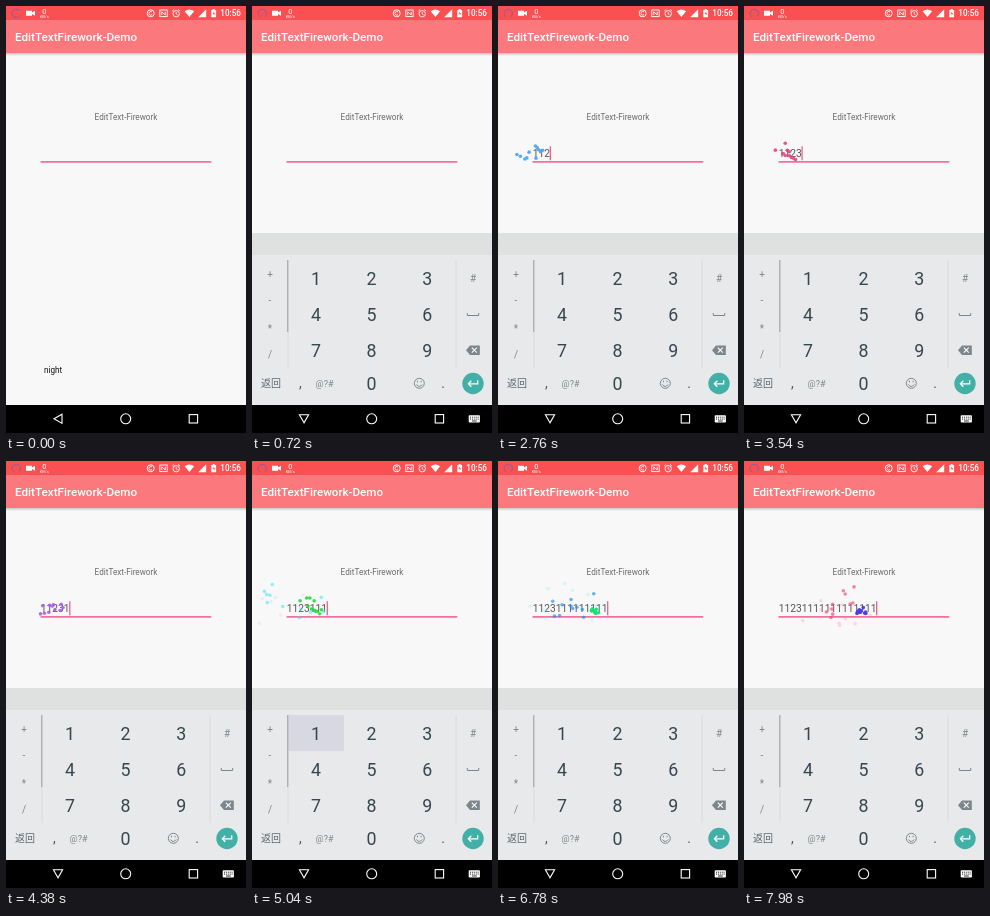
These frames come from a looping animation (240 by 427 pixels, 8000 ms). An HTML page:

```html
<!DOCTYPE html>
<html lang="en">
<head>
<meta charset="utf-8">
<title>EditTextFirework-Demo</title>
<style>
  html, body { margin: 0; width: 100%; height: 100%; overflow: hidden; background: #f8f8f8; }
  svg { display: block; width: 100vw; height: 100vh; font-family: Roboto, sans-serif; }
  .mid { text-anchor: middle; }
  .line { fill: none; stroke: #fff; }
  .digits { font-size: 17.8px; fill: #37474f; }
  .marks { font-size: 10px; fill: #7d878b; }
  .cjk { font-family: "Noto Sans CJK SC", "Noto Sans CJK", sans-serif; fill: #59666c; }
</style>
</head>
<body>
<svg viewBox="0 0 240 427" preserveAspectRatio="none">
  <defs>
    <clipPath id="screen"><rect width="240" height="399"/></clipPath>
    <linearGradient id="shade" x2="0" y2="1">
      <stop stop-color="#000" stop-opacity=".2"/>
      <stop offset="1" stop-color="#000" stop-opacity="0"/>
    </linearGradient>
  </defs>
  <rect width="240" height="427" fill="#f8f8f8"/>

  <text x="120" y="114" class="mid" font-size="8.17" fill="#6a6a6a">EditText-Firework</text>
  <text x="38" y="367" font-size="8.17" fill="#111">night</text>
  <rect x="34.5" y="155.2" width="170.8" height="1.4" fill="#f2508c"/>
  <text id="entry" x="34.8" y="151.2" font-size="10.22" fill="#555"></text>
  <rect id="cursor" y="140.3" width="1.2" height="14" fill="#f2508c"/>
  <g id="sparks"></g>

  <rect y="47" width="240" height="3" fill="url(#shade)"/>
  <rect y="14" width="240" height="33" fill="#fb797d"/>
  <rect width="240" height="14" fill="#fa5052"/>
  <text x="9" y="35" font-size="11.67" font-weight="500" fill="#fff">EditTextFirework-Demo</text>

  <g id="status" fill="#fff">
    <path id="ring" d="M8 11A4.2 4.2 0 1 1 12.5 11" class="line" style="stroke:#8061a8"/>
    <path d="M20 4.8h6v5h-6zM26 6.5l3-1.7v5l-3-1.7z"/>
    <text x="38.3" y="7.6" class="mid" font-size="7.4">0</text>
    <text x="38.3" y="12.2" class="mid" font-size="4.2">KB/s</text>
    <circle cx="144.7" cy="7.3" r="3.5" class="line"/>
    <path d="M146 6a1.8 1.8 0 1 0 0 2.6" class="line" stroke-width=".9"/>
    <rect x="153.8" y="4" width="7.4" height="6.6" class="line" stroke-width=".9"/>
    <path d="M155.8 9V5.8l3.4 3.2V5.8" class="line" stroke-width=".9"/>
    <circle cx="170.2" cy="7.7" r="3.2" class="line" stroke-width=".9"/>
    <path d="M170.2 5.8v2.2l1.4.9M166.3 5l2-1.7M174 5l-2-1.7" class="line" stroke-width=".8"/>
    <path d="M178.7 5.2q4.7-3.4 9.4 0L183.4 11z"/>
    <path d="M200.2 3.2v8h-8z"/>
    <path d="M205.3 4h1.4V3h2v1h1.4v7.3h-4.8z"/>
    <path d="M208.2 5.2l-1.7 2.6h1.2v2l1.5-2.5H208z" fill="#fa5052"/>
    <text x="235" y="10.2" text-anchor="end" font-size="8.17" font-weight="500">10:56</text>
  </g>

  <g clip-path="url(#screen)">
    <g id="keyboard">
      <rect y="227" width="240" height="22" fill="#dfe1e1"/>
      <rect y="249" width="240" height="150" fill="#e8e9ea"/>
      <rect id="pressed" y="254" width="56" height="36" fill="#d7d8e2"/>
      <path d="M36 254v108M204 254v108" stroke="#d4d7d8" stroke-width=".8"/>
      <path d="M35.7 254v72" stroke="#a9afb2" stroke-width="1.3"/>
      <g id="digits" class="mid digits"></g>
      <g class="mid marks">
        <text x="18" y="271.5">+</text><text x="18" y="298">-</text>
        <text x="18" y="326">*</text><text x="18" y="352">/</text>
        <text x="221" y="276">#</text>
        <text x="72.5" y="380.5" font-size="9">@?#</text>
      </g>
      <text x="19" y="381" class="mid cjk" font-size="10">返回</text>
      <g class="mid" font-size="14" fill="#4c5a60">
        <text x="48.5" y="382">,</text><text x="191" y="382">.</text>
      </g>
      <path d="M215.3 307v2.5h11.4V307" class="line" style="stroke:#7d878b"/>
      <path d="M214 344.2l4-4.7h9.8v9.4H218z" fill="#7d878b"/>
      <path d="M219.8 341.7l5 5M224.8 341.7l-5 5" class="line" stroke-width="1.1"/>
      <g fill="none" stroke="#7d878b">
        <circle cx="167.3" cy="377.3" r="5"/>
        <path d="M164.5 378.5q2.8 4 5.6 0M165.5 374.8v1.5M169.1 374.8v1.5"/>
      </g>
      <circle cx="221" cy="377.5" r="10.7" fill="#42b0a6"/>
      <path d="M225.7 374.2v3.6h-9M219.3 374.8l-2.9 3 2.9 3" class="line" stroke-width="1.3"/>
    </g>
  </g>

  <rect y="399" width="240" height="28" fill="#000"/>
  <g class="line" stroke-width="1.1">
    <path id="back" d="M48 412.8l8-4.6v9.2z"/>
    <circle cx="119.7" cy="412.8" r="5"/>
    <rect x="183.2" y="408.6" width="8.4" height="8.4"/>
  </g>
  <g id="switcher">
    <rect x="216.7" y="409.2" width="11.2" height="7.4" rx=".8" fill="#fff"/>
    <path d="M218 411.2h8.6M218 413.1h8.6" stroke="#000" stroke-width=".9" stroke-dasharray="1 .9"/>
    <path d="M220 415h4.8" stroke="#000" stroke-width=".8"/>
  </g>
</svg>
<script>
const LOOP = 8000, STEP = 60, FADE = 850, SHOW = 180, SLIDE = 260;
const PER_BURST = 11, LEFT = 34.8, ADVANCE = 5.74;
const entry = "1123" + "1".repeat(13);
const typedAt = [960, 1820, 2610, 3380, 4250, 4550, 4860, 5170, 5480, 5790,
                 6100, 6410, 6720, 7020, 7320, 7620, 7920];
const colors = ["#f58a3c", "#f5ea35", "#45a0f0", "#e93b7c", "#b05cf0", "#32e6f6",
                "#18d632", "#f2a033", "#e85ad0", "#5fd63a", "#6cf0ea", "#1f8af2",
                "#14e070", "#f0c040", "#f5859c", "#ee4a74", "#4636ea"];
const $ = id => document.getElementById(id);
const show = (id, on) => $(id).setAttribute("visibility", on ? "visible" : "hidden");

function add(parent, tag, attrs) {
  const node = document.createElementNS("http://www.w3.org/2000/svg", tag);
  for (const key in attrs) node.setAttribute(key, attrs[key]);
  return parent.appendChild(node);
}

let seed = 29;
function random() {
  seed = (seed * 16807) % 2147483647;
  return seed / 2147483647;
}

for (let n = 0; n < 10; n++) {
  const x = n ? 64 + (n - 1) % 3 * 55.6 : 119.6;
  const y = n ? 278.8 + Math.floor((n - 1) / 3) * 36 : 384.3;
  add($("digits"), "text", { x, y }).textContent = n;
}

const bursts = typedAt.map((start, i) => ({
  start,
  x: Math.max(37, LEFT + (i + 1) * ADVANCE - 12),
  group: add($("sparks"), "g", { fill: colors[i] }),
  sparks: []
}));
for (const burst of bursts) {
  for (let i = 0; i < PER_BURST; i++) {
    burst.sparks.push({
      angle: random() * Math.PI,
      speed: 25 + random() * 75,
      dot: add(burst.group, "circle", { r: 1.8 })
    });
  }
}

function drawBurst({ start, x, group, sparks }, t) {
  const u = (t - start) / FADE;
  const alive = u >= 0 && u < 1;
  group.setAttribute("opacity", alive ? 1 - u * u * .35 - u * .65 : 0);
  if (!alive) return;
  const reach = u - u * u / 2;
  for (const { angle, speed, dot } of sparks) {
    dot.setAttribute("cx", x + Math.cos(angle) * speed * reach - 35 * u);
    dot.setAttribute("cy", 153 - Math.sin(angle) * speed * reach + 20 * u * u);
  }
}

function draw(t) {
  const count = typedAt.filter(at => at <= t).length;
  $("entry").textContent = entry.slice(0, count);
  $("cursor").setAttribute("x", LEFT + count * ADVANCE - (count ? .3 : 0));
  const touched = count ? typedAt[count - 1] : SHOW;
  show("cursor", t >= SHOW && (t - touched) % 1000 < 500);
  bursts.forEach(burst => drawBurst(burst, t));

  // Characters are committed when the key is released.
  const next = typedAt[count];
  show("pressed", next && t >= next - 140 && t < next - 10);
  $("pressed").setAttribute("x", 36 + (entry[count] - 1 || 0) * 56);

  const p = Math.min(1, Math.max(0, (t - SHOW) / SLIDE));
  $("keyboard").setAttribute("transform", `translate(0 ${172 * (1 - p) ** 3})`);
  show("switcher", p > 0);
  $("back").setAttribute("transform", p > 0 ? "rotate(-90 52 412.8)" : "");
  $("ring").setAttribute("transform", t < STEP ? "rotate(-90 10.2 7.4)" : "");
}

function frame() {
  const t = performance.now() % LOOP;
  draw(Math.floor(t / STEP) * STEP);
  requestAnimationFrame(frame);
}
frame();
</script>
</body>
</html>
```
